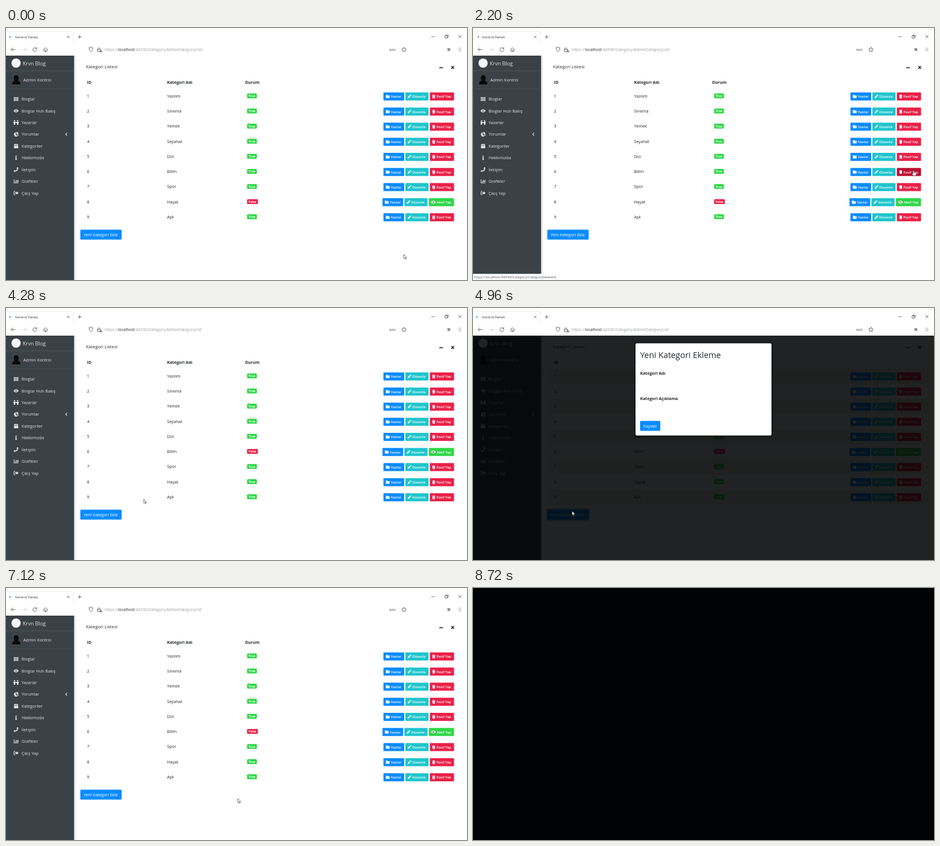
Write an HTML page that moves like this. It is 800 px wide and 438 px high and loops after 8840 ms.

```html
<!DOCTYPE html>
<html lang="tr">
<head>
<meta charset="utf-8">
<title>Kontrol Paneli</title>
<style>
  html, body { margin: 0; width: 100%; height: 100%; overflow: hidden; background: #fff; }
  svg { display: block; width: 800px; height: 438px; font-family: "Open Sans", "Noto Sans", sans-serif; font-size: 7.2px; fill: #24282c; }
  .line { fill: none; stroke: #3b3f43; stroke-width: .75; stroke-linecap: round; stroke-linejoin: round; }
  .pale { opacity: .3; }
  .bold { font-weight: 700; }
  .side { fill: #dfe3e6; }
  .side .line { stroke: #dfe3e6; stroke-width: 1.1; }
  .btn { font-size: 5.9px; font-weight: 600; fill: #fff; }
  .badge { font-size: 5.2px; font-weight: 700; fill: #fff; }
  .blue { fill: #0a8cff; } .teal { fill: #20c5cc; } .red { fill: #ea2149; } .green { fill: #30d648; }
  .hover .act.red { fill: #bd0f33; }
  .hover .act.green { fill: #22a038; }
  .hover.blue { fill: #0876dc; }
  .on .off-only, .off .on-only { display: none; }
</style>
</head>
<body>
<svg viewBox="0 0 800 438">
  <defs>
    <linearGradient id="shade"><stop offset="0" stop-opacity=".2"/><stop offset="1" stop-opacity="0"/></linearGradient>
    <filter id="glow" x="-10%" y="-10%" width="120%" height="120%"><feDropShadow dx="0" dy="0" stdDeviation="2" flood-opacity="1"/></filter>
    <g id="eye"><path d="M-4.6 0Q0-6 4.6 0Q0 6-4.6 0Z"/><circle r="2" fill="#3a4147" fill-opacity=".75"/><circle r="1"/></g>
    <path id="folder" d="M-3.5-2.3q0-.6.6-.6h2l1 1h2.8q.6 0 .6.6v3.6q0 .6-.6.6h-5.8q-.6 0-.6-.6z"/>
    <path id="pen" d="M-3.2 3.2l.5-2.1 3.7-3.7 1.7 1.7-3.8 3.7zM1.5-3l.5-.4q.4-.3.8 0l.7.8q.3.4 0 .8l-.4.4z"/>
    <path id="bin" d="M-2.7-2.8h1.6l.4-.6h1.4l.4.6h1.6v.9h-5.4zM-2.3-1.5h4.6l-.3 4.4q0 .6-.6.6h-2.8q-.6 0-.6-.6z"/>
  </defs>

  <rect width="800" height="438" fill="#fff"/>

  <!-- browser bar -->
  <path d="M0 5.5H115q2 0 2 2V24" fill="none" stroke="#e4e4e7" stroke-width=".8"/>
  <rect id="fav" x="5.5" y="14.3" width="2.4" height="2.4" fill="#23b2aa"/>
  <circle id="dot" cy="15.5" r="1.1" fill="#2b3a44"/>
  <text x="16" y="17.8" font-size="6">Kontrol Paneli</text>
  <path class="line" d="M106.2 13.7l3.6 3.6m0-3.6l-3.6 3.6M125 15.5h5.6m-2.8-2.8v5.6M738.5 15h5M785.3 12.7l4.6 4.6m0-4.6l-4.6 4.6M762.3 13.7h3.8v3.8h-3.8zM763.5 13.5v-1.2h3.8v3.8h-1.2"/>
  <path class="line" d="M16 37.5H9m3-3l-3 3 3 3"/>
  <path class="line pale" d="M28 37.5h7m-3-3l3 3-3 3"/>
  <path id="reload" class="line" d="M52.9 35.6A3.4 3.4 0 1 0 53.5 38M53.3 33.7v2.2h-2.2"/>
  <path class="line" d="M65 37.4l3.5-3.3 3.5 3.3M66 36.8v4h5v-4M68.5 40.8v-2.4"/>
  <path class="line" d="M147.5 33.3l3.3 1.1q.2 4.6-3.3 6.7-3.5-2.1-3.3-6.7zM159 37h4.6v4H159zM159.8 37v-1.6q1.5-3 3 0V37M163.2 41.2l1.8-3 1.8 3z"/>
  <text y="40.2" font-size="6.9" fill="#9a9da2"><tspan x="171">https://</tspan><tspan fill="#25282c">localhost</tspan><tspan id="path"></tspan></text>
  <text x="665" y="39.6" font-size="5.6" fill="#45494d">%90</text>
  <path class="line" d="M690.5 33.4l1.2 2.6 2.8.4-2 2 .5 2.8-2.5-1.4-2.5 1.4.5-2.8-2-2 2.8-.4z"/>
  <rect x="766" y="35" width="5" height="5" fill="#94979b"/>
  <path class="line" opacity=".55" d="M785 35h5m-5 2.4h5m-5 2.4h5"/>

  <!-- card -->
  <g id="stripes" fill="#8a7a50"></g>
  <text x="138.7" y="69.6" font-size="7.8">Kategori Listesi</text>
  <path d="M752 69h6.3M772.8 66.3l4.8 4.8m0-4.8l-4.8 4.8" fill="none" stroke="#15181a" stroke-width="1.4"/>
  <g class="bold"><text x="140.5" y="97.2">ID</text><text x="279.5" y="97.2">Kategori Adı</text><text x="415" y="97.2">Durum</text></g>
  <g id="rows"></g>
  <rect id="ring" x="127" y="348.5" width="75.5" height="21" rx="2.5" fill="#3ba4ff" opacity=".6"/>
  <rect id="add" class="blue" x="129" y="350.5" width="71.7" height="17.3" rx="1.6"/>
  <text x="134.8" y="361.9" fill="#fff">Yeni Kategori Ekle</text>

  <!-- sidebar -->
  <rect y="48" width="118" height="390" fill="#3a4147"/>
  <rect x="118" y="48" width="4" height="390" fill="url(#shade)"/>
  <path d="M0 74.5H118M5 106H113" stroke="#50575d" stroke-width=".8"/>
  <g class="side">
    <circle cx="17.5" cy="61" r="8" fill="#f4f5f6"/>
    <text x="29" y="65" font-size="9">Krvn Blog</text>
    <path d="M10.5 98q0-5.5 4.5-6.5-2-3-1.3-6 1-3.6 4.1-3.6t4.1 3.6q.5 3-1.5 6 4.6 1 4.6 6.5z" fill="#08090a"/>
    <text x="30" y="93.2" font-size="7.25">Admin Kontrol</text>
    <g id="menu"></g>
    <path class="line" d="M105.7 182.4l-2.2 2.2 2.2 2.2"/>
  </g>

  <!-- dialog -->
  <g id="dialog">
    <rect y="48" width="800" height="390" fill="#010203" fill-opacity=".87"/>
    <rect x="282" y="61.5" width="236" height="160" rx="2.5" fill="#fff" filter="url(#glow)"/>
    <text x="290" y="86.6" font-size="14.4">Yeni Kategori Ekleme</text>
    <g class="bold"><text x="290" y="115.8">Kategori Adı</text><text x="290" y="160.3">Kategori Açıklama</text></g>
    <rect class="blue" x="290" y="196.2" width="35" height="17.4" rx="1.6"/>
    <text x="295.8" y="207.6" fill="#fff">Kaydet</text>
  </g>

  <g id="status"><rect y="427.3" width="148" height="10.7" fill="#fdfdfe"/><text id="link" x="2" y="435.4" font-size="6" fill="#55585c"></text></g>

  <g id="pointer">
    <path id="arrow" d="M0 0V7.2L1.7 5.7 2.9 8.4 4 7.9 2.8 5.3H5z" fill="#fff" stroke="#222" stroke-width=".6"/>
    <path id="hand" d="M-.8 0q.8-1 1.6 0v3l3 .8q1 .4.8 1.6l-.7 3.4h-4.3l-2.4-3.5q.2-1.3 2 .1z" fill="#fff" stroke="#222" stroke-width=".6"/>
  </g>
  <rect id="black" width="800" height="438" fill="#010204"/>
</svg>

<script>
const LOOP = 8840, RELOAD_A = 2440, RELOAD_B = 3520, OPEN = 4920, CLOSE = 7000;
const $ = id => document.getElementById(id);
const show = (id, yes) => { $(id).style.display = yes ? '' : 'none'; };
const ramp = (t, a, b) => Math.min(1, Math.max(0, (t - a) / (b - a)));
const between = (t, a, b) => t >= a && t < b;

const names = ['Yazılım', 'Sinema', 'Yemek', 'Seyahat', 'Dizi', 'Bilim', 'Spor', 'Hayat', 'Aşk'];
const rowY = i => 119 + 26.25 * i;

const button = (x, y, w, color, icon, iconX, textX, label, extra = '') =>
  `<rect class="${color} ${extra}" x="${x}" y="${y - 7}" width="${w}" height="14" rx="1.3"/>
   <use href="#${icon}" transform="translate(${iconX} ${y}) scale(.92)"/>
   <text x="${textX}" y="${y + 2.3}">${label}</text>`;

const badge = (y, w, color, label) =>
  `<rect class="${color}" x="418.4" y="${y - 5.2}" width="${w}" height="8.4" rx="1.5"/>
   <text x="${418.4 + w / 2}" y="${y + 1.1}" text-anchor="middle">${label}</text>`;

$('rows').innerHTML = names.map((name, i) => {
  const y = rowY(i);
  const pair = dx => button(655 + dx, y, 36, 'blue', 'folder', 662.5 + dx, 667.7 + dx, 'Yazılar') +
    button(693 + dx, y, 40.3, 'teal', 'pen', 700 + dx, 705 + dx, 'Düzenle');
  return `<g id="row${i}">
    <text x="140.5" y="${y + 1.8}">${i + 1}</text><text x="279.5" y="${y + 1.8}">${name}</text>
    <g class="on-only"><g class="badge">${badge(y, 17, 'green', 'True')}</g>
      <g class="btn">${pair(0)}${button(735.5, y, 42, 'red', 'bin', 742.3, 747, 'Pasif Yap', 'act')}</g></g>
    <g class="off-only"><g class="badge">${badge(y, 18.6, 'red', 'False')}</g>
      <g class="btn">${pair(-1.7)}${button(734, y, 43.5, 'green', 'eye', 741.7, 747.6, 'Aktif Yap', 'act')}</g></g>
  </g>`;
}).join('');

$('stripes').innerHTML = names.map((_, i) =>
  `<rect x="134" y="${rowY(i) - 13.1}" width="656" height="26.2" opacity="${i % 2 ? 0 : .12}"/>`).join('');

const menu = [
  ['Bloglar', '<path d="M-4-3.3h2.3v1.8H-4zM-1.2-3.3h2.3v1.8h-2.3zM1.6-3.3H4v1.8H1.6zM-4-1h2.3V.9H-4zM-1.2-1h2.3V.9h-2.3zM1.6-1H4V.9H1.6zM-4 1.4h2.3v1.9H-4zM-1.2 1.4h2.3v1.9h-2.3zM1.6 1.4H4v1.9H1.6z"/>'],
  ['Bloglar Hızlı Bakış', '<use href="#eye"/>'],
  ['Yazarlar', '<circle cx="-2.6" cy="-3" r="1.2"/><circle cx="2.6" cy="-3" r="1.2"/><path d="M-4.5-1.5h3L0-.2l1.5-1.3h3V1.2H4v2.6H1.6V.8L0 1.2-1.6.8v3H-4V1.2h-.5z"/>'],
  ['Yorumlar', '<path d="M-.6-3.8V.5l3 3A4 4 0 1 1-.6-3.8zM.5-4.2A4 4 0 0 1 4.2-.6H.5zM.8.4h3.6q-.1 1.8-1.2 2.6z"/>'],
  ['Kategoriler', '<path d="M-3.8-.6v4q0 .5.5.5h6.6q.5 0 .5-.5v-4zM-3.7-1.2l1-2.4h2.4v2.4zM3.7-1.2l-1-2.4H.3v2.4z"/>'],
  ['Hakkımızda', '<circle cy="-3" r="1.1"/><path d="M-1.4-1.3H.9v3.9h.7v1.1h-3.2V2.6h.7V-.2h-.5z"/>'],
  ['İletişim', '<path d="M3.9-3.4Q4 3.9-3.6 3.9L-4 2l2.2-1 1 1Q1 1.1 1.9-.9l-1-1L1.9-4z"/>'],
  ['Grafikler', '<path d="M-4-3.4h1v5.6h7v1H-4zM-2-.1h1.2v1.6H-2zM-.1-2.4h1.2v3.9H-.1zM1.7-1.2h1v2.7h-1zM3.1-2.8h1v4.3h-1z"/>'],
  ['Çıkış Yap', '<path d="M-1-3.4v1h-2v4.8h2v1h-2q-1.1 0-1.1-1.1v-4.6q0-1.1 1.1-1.1zM-1.6-1.1H1v-1.9L4.3 0 1 3V1.1h-2.6z"/>']
];
$('menu').innerHTML = menu.map(([label, icon], i) => {
  const y = 123.5 + 20.42 * i;
  return `<g transform="translate(17.5 ${y})">${icon}</g><text x="27" y="${y + 2.7}">${label}</text>`;
}).join('');

// time, x, y of the pointer tip
const route = [
  [40, 690.5, 393.5], [520, 755, 331], [680, 755, 331], [1100, 771, 296], [1640, 764.5, 248],
  [2640, 764.5, 248], [3080, 755, 299.5], [3560, 755, 299.5], [4280, 239, 332], [4360, 239, 332],
  [4640, 172, 353], [5260, 172, 353], [5880, 305, 136], [6040, 305, 136], [6160, 342.5, 154],
  [6680, 402.3, 366], [7160, 402.3, 366], [7760, 440, 384]
];
function pointerAt(t) {
  const n = route.findIndex(p => p[0] > t);
  if (n === 0) return route[0].slice(1);
  if (n < 0) return route[route.length - 1].slice(1);
  const [t0, x0, y0] = route[n - 1], [t1, x1, y1] = route[n];
  const u = (t - t0) / (t1 - t0), k = u * u * (3 - 2 * u);
  return [x0 + (x1 - x0) * k, y0 + (y1 - y0) * k];
}

const base = 'https://localhost:44336/Category/';
const links = [
  [1640, 2300, base + 'CategoryDelete/6'], [2300, RELOAD_A, 'localhost'],
  [RELOAD_A + 80, 2780, base + 'CategoryActive/6'],
  [3040, 3320, base + 'CategoryActive/8'], [3320, RELOAD_B, 'localhost']
];

function draw(t) {
  const [x, y] = pointerAt(t);
  const open = between(t, OPEN, CLOSE);
  const loading = between(t, 2120, RELOAD_A) || between(t, 3240, RELOAD_B);
  const link = links.find(([a, b]) => between(t, a, b));
  const overAdd = !open && x > 129 && x < 200.7 && y > 350.5 && y < 367.8;
  let hand = overAdd;

  names.forEach((_, i) => {
    const off = i === 5 ? t >= RELOAD_A : i === 7 && t < RELOAD_B;
    const hover = !open && x > 735 && x < 777.5 && Math.abs(y - rowY(i)) < 7;
    hand = hand || hover;
    $('row' + i).setAttribute('class', (off ? 'off' : 'on') + (hover ? ' hover' : ''));
  });

  $('add').setAttribute('class', overAdd ? 'blue hover' : 'blue');
  show('ring', between(t, OPEN - 80, CLOSE));
  $('pointer').setAttribute('transform', `translate(${x} ${y})`);
  show('hand', hand);
  show('arrow', !hand);

  show('fav', !loading);
  show('dot', loading);
  $('dot').setAttribute('cx', 7.2 + 2.4 * Math.sin(t / 110));
  const busy = link && link[2] === 'localhost';
  $('reload').setAttribute('transform', busy ? 'rotate(-90 50 37.5)' : '');
  $('path').textContent = ':44336/Category/AdminCategoryList' + (t < RELOAD_A ? '/' : '');

  show('status', link);
  if (link) $('link').textContent = link[2];

  show('dialog', open);
  show('stripes', open);
  $('black').setAttribute('opacity', ramp(t, 8400, 8720));
}

const start = performance.now();
function tick() {
  draw((performance.now() - start) % LOOP);
  requestAnimationFrame(tick);
}
tick();
</script>
</body>
</html>
```
